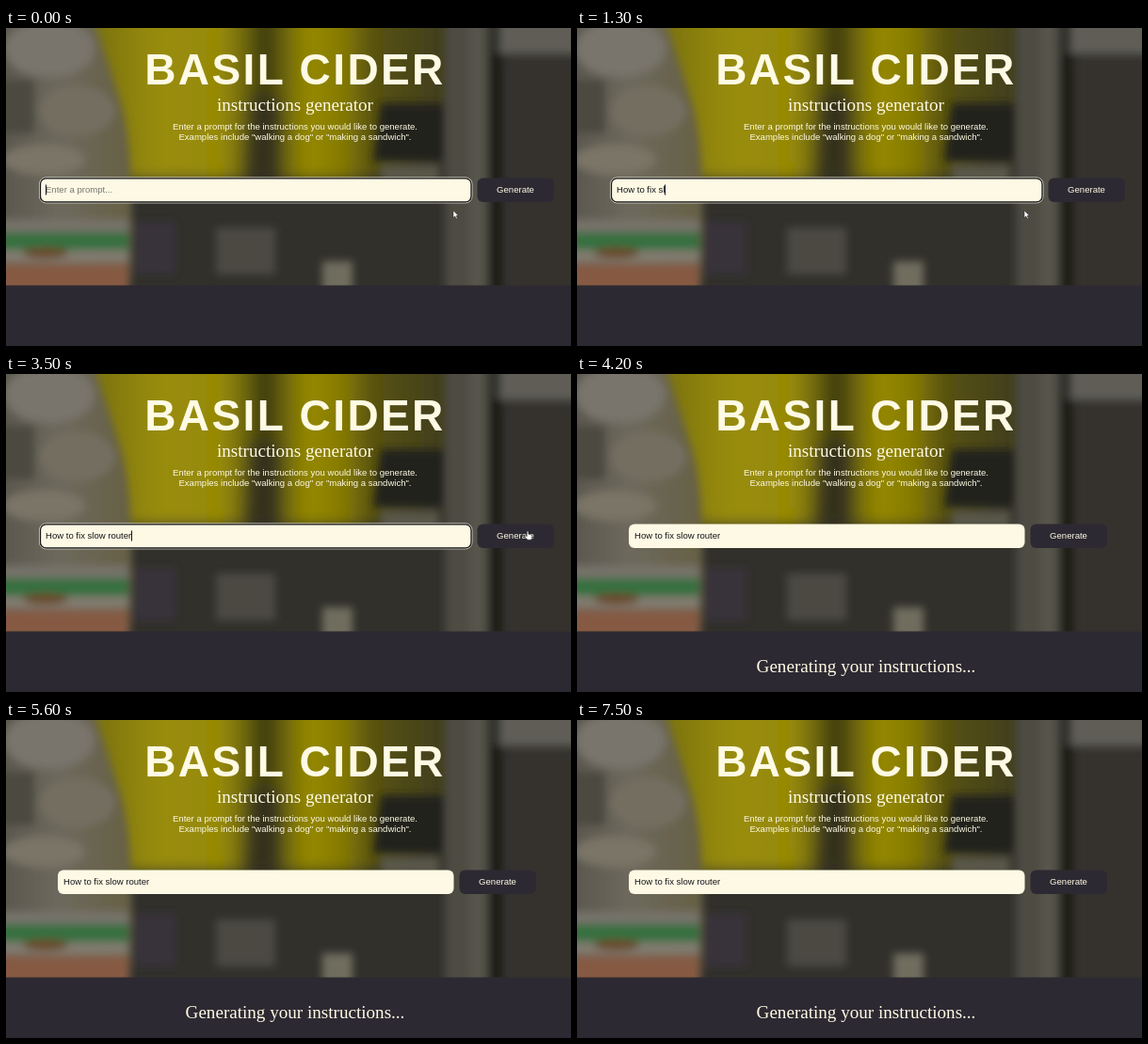
Write an HTML page that moves like this. It is 600 px wide and 338 px high and loops after 7.6 s.

```html
<!DOCTYPE html>
<html lang="en">
<head>
<meta charset="utf-8">
<title>Instructions generator</title>
<style>
  html, body { margin: 0; width: 100%; height: 100%; overflow: hidden; background: #2d2932; }
  svg { display: block; width: 100vw; height: 100vh; }
  text { font: 9.55px "Liberation Sans", Arial, sans-serif; fill: #fefae4; white-space: pre; }
  .mid { text-anchor: middle; }
  .title { font-size: 46px; font-weight: bold; letter-spacing: 2.4px; }
  .serif { font: 19.1px "Liberation Serif", "Times New Roman", serif; }
</style>
</head>
<body>
<svg viewBox="0 0 600 338">
  <defs>
    <clipPath id="hero"><rect width="600" height="273.5"/></clipPath>
    <filter id="soft" x="-30%" y="-30%" width="160%" height="160%"><feGaussianBlur stdDeviation="4"/></filter>
    <filter id="wide" x="-30%" y="-30%" width="160%" height="160%"><feGaussianBlur stdDeviation="8"/></filter>
    <linearGradient id="yellow" gradientUnits="userSpaceOnUse" x1="100" x2="480">
      <stop offset="0" stop-color="#7d7410"/>
      <stop offset=".16" stop-color="#988c08"/>
      <stop offset=".34" stop-color="#978a06"/>
      <stop offset=".41" stop-color="#6a630c"/>
      <stop offset=".46" stop-color="#37350f"/>
      <stop offset=".52" stop-color="#6f670a"/>
      <stop offset=".58" stop-color="#968900"/>
      <stop offset=".68" stop-color="#857a04"/>
      <stop offset=".76" stop-color="#58520f"/>
      <stop offset="1" stop-color="#3c3a22"/>
    </linearGradient>
    <linearGradient id="bottle">
      <stop offset="0" stop-color="#55524a"/>
      <stop offset=".5" stop-color="#6d695d"/>
      <stop offset="1" stop-color="#666044"/>
    </linearGradient>
  </defs>

  <rect width="600" height="338" fill="#2d2932"/>
  <g clip-path="url(#hero)">
    <rect width="600" height="274" fill="#31302b"/>
    <g filter="url(#wide)">
      <path d="M60-30H480V130L380 162H60Z" fill="url(#yellow)"/>
      <path d="M258 70L292 75V165H252Z" fill="#34321a"/>
    </g>
    <g filter="url(#soft)">
      <path d="M398 80H468V142H390Z" fill="#22241b"/>
      <path d="M398 146H460V164H398Z" fill="#5a584a"/>
      <path d="M466-20H512V300H466Z" fill="#4d4b43"/>
      <path d="M492-20H508V300H492Z" fill="#56544b"/>
      <path d="M524-20H620V28H524Z" fill="#5f5d56"/>
      <path d="M514 26H527V300H514Z" fill="#1b1c19"/>
      <path d="M530 34H620V300H530Z" fill="#34332d"/>
      <path d="M-20-20H90L122 80Q140 140 130 300H-20Z" fill="url(#bottle)"/>
      <ellipse cx="46" cy="22" rx="48" ry="30" fill="#79756c"/>
      <ellipse cx="76" cy="88" rx="40" ry="26" fill="#736e60"/>
      <ellipse cx="40" cy="140" rx="44" ry="16" fill="#7a7566"/>
      <path d="M-20 55H30V112H-20Z" fill="#4b4941"/>
      <path d="M-20 204H130V218H-20Z" fill="#77736a"/>
      <path d="M-20 217H130V237H-20Z" fill="#356f40"/>
      <path d="M-20 236H130V249H-20Z" fill="#817b70"/>
      <path d="M-20 251H130V300H-20Z" fill="#865a42"/>
      <ellipse cx="42" cy="239" rx="24" ry="6" fill="#6b4a2c"/>
      <path d="M136 206H180V262H136Z" fill="#37333a"/>
      <path d="M223 212H286V262H223Z" fill="#4b4942"/>
      <path d="M336 248H368V283H336Z" fill="#706d5f"/>
    </g>
  </g>

  <text class="mid title" x="307" y="60">BASIL CIDER</text>
  <text class="mid serif" x="307" y="87.5">instructions generator</text>
  <text class="mid" x="307" y="107.5">Enter a prompt for the instructions you would like to generate.</text>
  <text class="mid" x="307" y="118.5">Examples include "walking a dog" or "making a sandwich".</text>

  <rect id="field" y="159.6" height="25.4" rx="6" fill="#fdf9e4"/>
  <g id="ring" fill="none">
    <rect x="35.5" y="158.9" width="459.5" height="27" rx="7" stroke="#d9d6c8"/>
    <rect x="36.5" y="159.9" width="457.5" height="25" rx="6" stroke="#16141a" stroke-width="1.3"/>
  </g>
  <text id="entry" y="175"></text>
  <path id="caret" d="M0 166.5V177.5" stroke="#111"/>
  <g id="button">
    <rect x="500.5" y="159.5" width="81.5" height="25.5" rx="6" fill="#2d2932"/>
    <text class="mid" x="541" y="175">Generate</text>
  </g>
  <text id="status" class="mid serif" x="307" y="317">Generating your instructions...</text>

  <g id="pointer" stroke="#222" stroke-width=".5" fill="#fff">
    <path id="arrow" d="M0 0V7.6L1.8 6L3.1 8.8L4.3 8.2L3.1 5.6H5.4Z"/>
    <path id="hand" d="M-.8 .6Q0-.6 .8 .6V3.2L4 4Q5 4.3 4.7 6L3.9 9.2H-.2L-3 5.8Q-2.9 4.5-1.8 5L-.8 5.8Z"/>
  </g>
</svg>
<script>
const LOOP = 7600, STEP = 100, TYPE_END = 2200, CLICK = 3700, STATUS = 4200;
const PROMPT = "How to fix slow router";
const PATH = [[2700, 475, 194], [3200, 554, 167], [3800, 554, 167], [4200, 606, 150]];

const el = id => document.getElementById(id);
const show = (id, on) => el(id).setAttribute("display", on ? "inline" : "none");
const clamp = v => Math.max(0, Math.min(1, v));
const ease = v => v * v * (3 - 2 * v);

function pointerAt(t) {
  let [, x, y] = PATH[0];
  for (let i = 1; i < PATH.length; i++) {
    const [from, x0, y0] = PATH[i - 1], [to, x1, y1] = PATH[i];
    if (t < from) break;
    const k = ease(clamp((t - from) / (to - from)));
    x = x0 + (x1 - x0) * k;
    y = y0 + (y1 - y0) * k;
  }
  return [x, y];
}

function draw(t) {
  const typed = PROMPT.slice(0, Math.floor(t / STEP));
  const focused = t < CLICK;
  const shrink = 19 * ease(clamp((t - CLICK) / 300));
  const left = 36 + shrink;

  el("field").setAttribute("x", left);
  el("field").setAttribute("width", 494.5 - shrink - left);
  el("button").setAttribute("transform", `translate(${-shrink})`);
  show("ring", focused);

  const entry = el("entry");
  entry.textContent = typed || "Enter a prompt...";
  entry.setAttribute("x", left + 6);
  entry.style.fill = typed ? "#16141a" : "#77756f";
  const caretX = left + 6 + (typed ? entry.getComputedTextLength() : 0);
  el("caret").setAttribute("transform", `translate(${Math.floor(caretX) + 0.5})`);
  show("caret", focused && (t < TYPE_END || (t - TYPE_END) % 1000 < 500));

  const [x, y] = pointerAt(t);
  const over = x > 500.5 - shrink && x < 582 - shrink && y > 159 && y < 185;
  el("pointer").setAttribute("transform", `translate(${x} ${y})`);
  show("pointer", t < STATUS);
  show("arrow", !over);
  show("hand", over);
  show("status", t >= STATUS);
}

const start = performance.now();
function frame() {
  const t = (performance.now() - start) % LOOP;
  draw(Math.floor(t / STEP) * STEP);
  requestAnimationFrame(frame);
}
frame();
</script>
</body>
</html>
```
